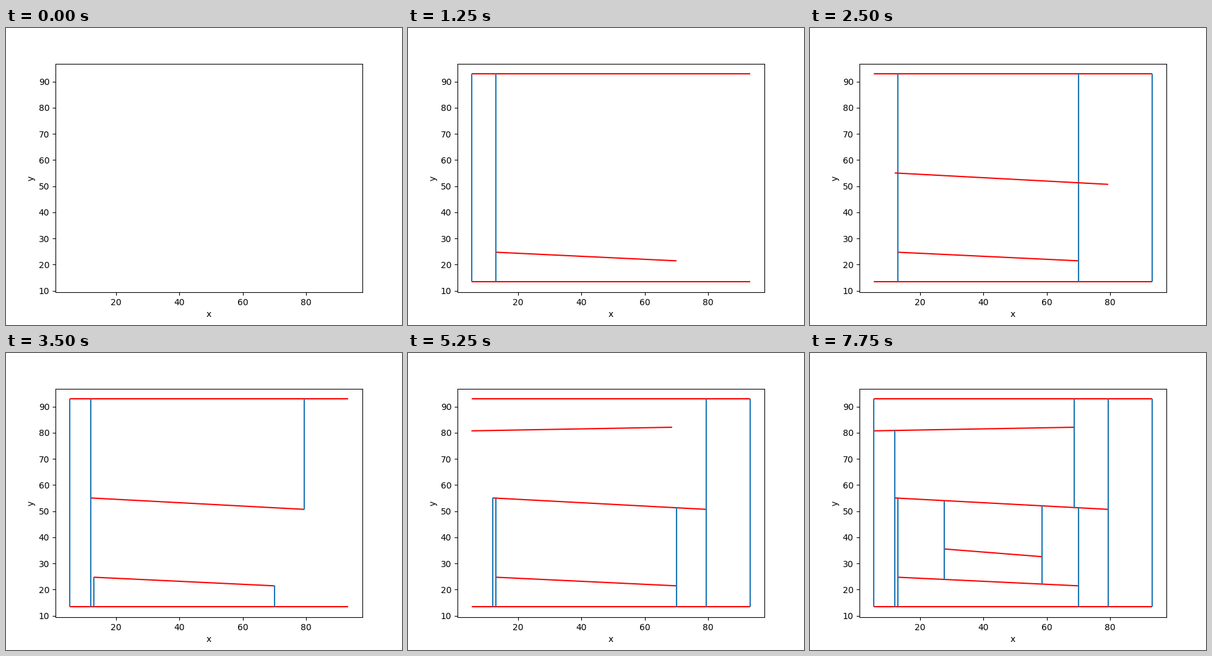
Animation, 640 px wide and 480 px high, one loop 8000 ms. Source, as a matplotlib script:

```python
"""Incremental construction of a trapezoidal map, one event per frame."""
import matplotlib.pyplot as plt
from matplotlib.animation import FuncAnimation
from matplotlib.collections import LineCollection

FRAMES = 32
INTERVAL = 250

LEFT, RIGHT = 5.28, 93.35
floor = ((LEFT, 13.36), (RIGHT, 13.36))
roof = ((LEFT, 92.88), (RIGHT, 92.88))
low = ((13.0, 24.72), (70.0, 21.43))
mid = ((12.0, 55.04), (79.4, 50.68))
high = ((LEFT, 80.72), (68.65, 82.09))
inner = ((27.63, 35.53), (58.5, 32.58))

fig, ax = plt.subplots(figsize=(6.4, 4.8), dpi=100)
ax.set_xlim(0.88, 97.755)
ax.set_ylim(9.38, 96.86)
ax.set_xlabel("x")
ax.set_ylabel("y")

lifetimes = []  # [artist, first frame, end frame]
clock = 0


def height(seg, x):
    (x0, y0), (x1, y1) = seg
    return y0 + (y1 - y0) * (x - x0) / (x1 - x0)


def show(lines, color):
    """Add one artist at the next frame and return its lifetime."""
    global clock
    clock += 1
    art = LineCollection(lines, colors=color, linewidths=1.5)
    ax.add_collection(art, autolim=False)
    life = [art, clock, FRAMES]
    lifetimes.append(life)
    return life


def segment(*segs):
    show(segs, "red")


def trapezoid(x0, x1, bottom, top):
    walls = [[(x, height(bottom, x)), (x, height(top, x))] for x in (x0, x1)]
    return show(walls, "C0")


def remove(*lives):
    global clock
    for life in lives:
        clock += 1
        life[2] = clock


def ends(seg):
    return seg[0][0], seg[1][0]


l0, l1 = ends(low)
m0, m1 = ends(mid)
h0, h1 = ends(high)
i0, i1 = ends(inner)

segment(floor, roof)
whole = trapezoid(LEFT, RIGHT, floor, roof)

segment(low)
remove(whole)
west = trapezoid(LEFT, l0, floor, roof)
above = trapezoid(l0, l1, low, roof)
trapezoid(l0, l1, floor, low)
east = trapezoid(l1, RIGHT, floor, roof)

segment(mid)
remove(west, above, east)
west = trapezoid(LEFT, m0, floor, roof)
above = trapezoid(m0, m1, mid, roof)
trapezoid(m0, l0, floor, mid)
between = trapezoid(l0, l1, low, mid)
trapezoid(l1, m1, floor, mid)
trapezoid(m1, RIGHT, floor, roof)

segment(high)
remove(west, above)
trapezoid(h0, h1, high, roof)
trapezoid(LEFT, m0, floor, high)
trapezoid(m0, h1, mid, high)
trapezoid(h1, m1, mid, roof)

segment(inner)
remove(between)
trapezoid(l0, i0, low, mid)
trapezoid(i0, i1, inner, mid)
trapezoid(i0, i1, low, inner)
trapezoid(i1, l1, low, mid)


def update(frame):
    for art, start, end in lifetimes:
        art.set_visible(start <= frame < end)
    return [life[0] for life in lifetimes]


anim = FuncAnimation(fig, update, frames=FRAMES, interval=INTERVAL,
                     repeat=True, repeat_delay=0, blit=False)
plt.show()
```
